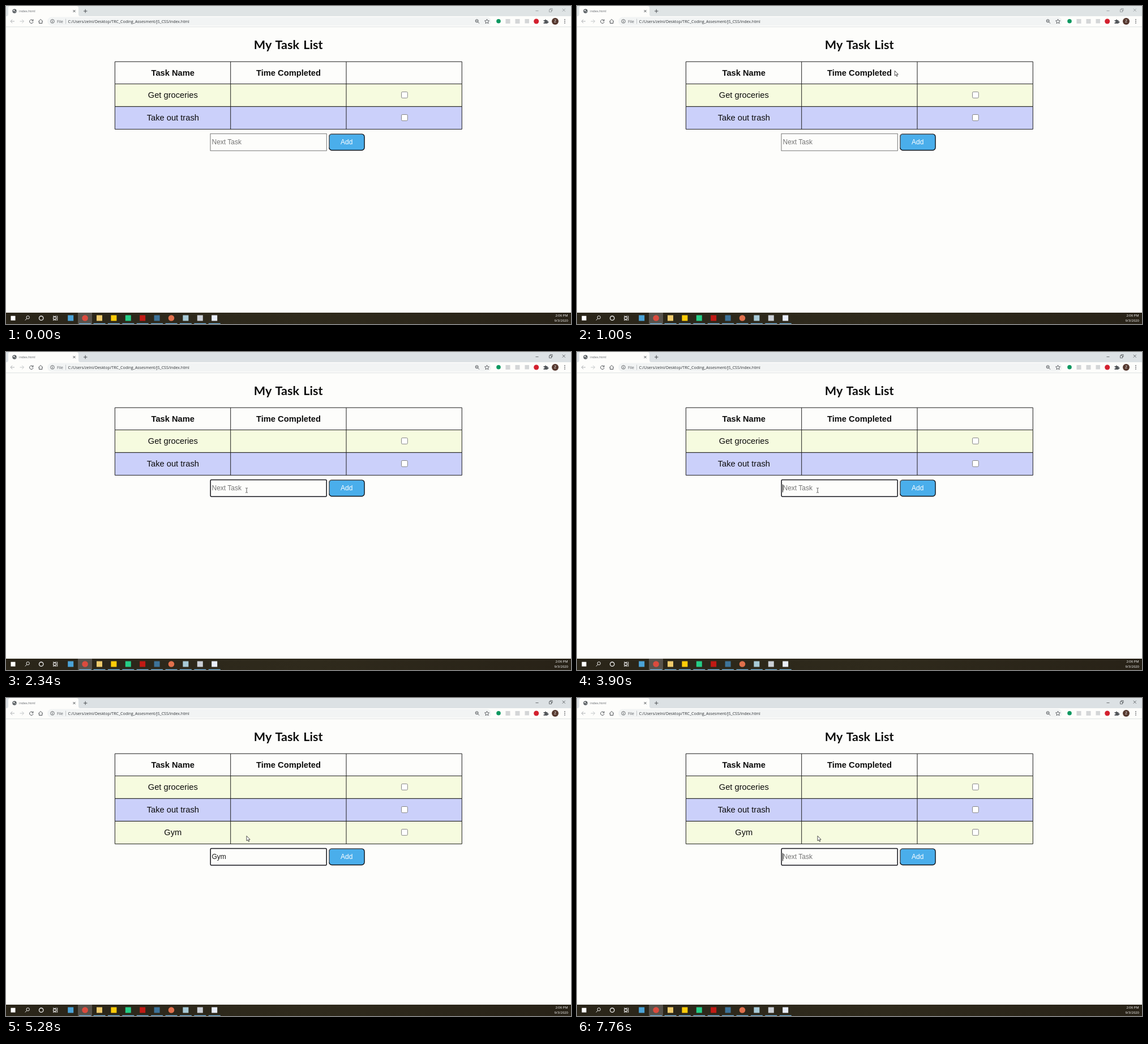
An HTML page that plays this animation: 998 px wide and 561 px high, repeating every 8 s.

```html
<!DOCTYPE html>
<html lang="en">
<head>
<meta charset="utf-8">
<title>My Task List</title>
<style>
  html, body { margin: 0; height: 100%; overflow: hidden; background: #fdfdfb; }
  svg { display: block; width: 998px; height: 561px; }
  text { font-family: "Liberation Sans", Arial, sans-serif; fill: #0c0c0c; }
  .ui text { font-family: "Open Sans", "Noto Sans", sans-serif; }
  .title { font: 700 21.6px Lato, sans-serif; word-spacing: 2px; text-anchor: middle; }
  .line { fill: none; stroke: #4d5155; stroke-width: 1; }
  .cell { font-size: 14.7px; text-anchor: middle; }
  .field { font-size: 12px; }
  .grid { fill: none; stroke: #1c1c1c; stroke-width: 1; }
</style>
</head>
<body>
<svg viewBox="0 0 998 561">
  <defs>
    <linearGradient id="bar">
      <stop offset="0" stop-color="#2a2519"/>
      <stop offset=".55" stop-color="#2f2a1c"/>
      <stop offset="1" stop-color="#282217"/>
    </linearGradient>
  </defs>
  <rect width="998" height="561" fill="#fdfdfb"/>

  <g class="ui">
    <rect id="strip" width="998" height="18"/>
    <path d="M1 18Q4 18 4 14V4Q4 0 8 0H124Q128 0 128 4V14Q128 18 131 18Z" fill="#fdfdfb"/>
    <circle cx="15" cy="9" r="3.7" fill="#5b6064"/>
    <path d="M12.5 8l2-1.5 1 1.5-1 1.5zM15.5 11l1.5-2 .5 1z" fill="#fff"/>
    <text x="23" y="11" font-size="5.8" style="fill:#5f6368">index.html</text>
    <path class="line" d="M118.500 7l4 4m0-4l-4 4M137 9h6.500M140.200 5.700v6.500"/>
    <g id="controls" class="line">
      <path d="M935.500 8.500h5M959.500 6.500h4v4h-4zM961 6v-1.500h4v4h-1.500M982.800 4.700l5 5m0-5l-5 5" stroke-width=".8"/>
    </g>

    <path d="M0 36.800H998" stroke="#dde0e2"/>
    <rect x="73" y="19.500" width="784" height="15" rx="7.500" fill="#f2f4f4"/>
    <path class="line" d="M15 27H8m3.200-3.200L8 27l3.200 3.200" style="stroke:#adb0b3"/>
    <path class="line" d="M24.500 27h7m-3.200-3.200l3.200 3.200-3.200 3.200" style="stroke:#c3c6c8"/>
    <path class="line" d="M47.300 25.200A3.200 3.200 0 1 0 48 28M48 23.500v2.700h-2.700M57.300 27.300L61.200 23.500l3.900 3.800M58.500 26.500v4h5.400v-4"/>
    <circle class="line" cx="82" cy="27" r="3.300" style="stroke-width:.8"/>
    <path class="line" d="M82 26.500v2.500M82 24.700v.9"/>
    <text x="90" y="29.500" font-size="6.980" style="fill:#5f6368">File</text>
    <path d="M105.500 22.500v9" stroke="#c4c7ca"/>
    <text x="109.500" y="29.500" font-size="6.980" style="fill:#303438">C:/Users/zelni/Desktop/TRC_Coding_Assesment/JS_CSS/index.html</text>

    <circle class="line" cx="831.700" cy="26.300" r="2.500"/>
    <path class="line" d="M833.500 28.200l2.500 2.500M830.500 26.300h2.400"/>
    <path class="line" style="stroke-width:.9" d="M849.500 23.200l1.200 2.600 2.800.3-2.100 1.900.6 2.800-2.500-1.500-2.500 1.500.6-2.800-2.100-1.900 2.800-.3z"/>
    <circle cx="870" cy="26.800" r="3.800" fill="#0c9860"/>
    <g fill="#d4d6d7">
      <rect x="882.500" y="23" width="8" height="8"/>
      <rect x="899.500" y="23" width="8" height="8"/>
      <rect x="916.500" y="23" width="7.500" height="7.500"/>
    </g>
    <circle cx="936.700" cy="27" r="4.500" fill="#d3202e"/>
    <path d="M949.500 25h2.200a1.300 1.300 0 1 1 2.600 0h2.200v2.200a1.300 1.300 0 1 1 0 2.200v1.600h-7v-2a1.300 1.300 0 1 0 0-2.300z" fill="#53575b"/>
    <circle cx="970" cy="27" r="6" fill="#55382f"/>
    <text x="970" y="29.300" font-size="6.300" text-anchor="middle" style="fill:#fff">Z</text>
    <path d="M987 23.300v1.500m0 1.500v1.500m0 1.500v1.500" stroke="#505458" stroke-width="1.500"/>
  </g>

  <text class="title" x="498.700" y="75.500">My Task List</text>
  <g class="cell" font-weight="700">
    <text x="294.800" y="123">Task Name</text>
    <text x="499" y="123">Time Completed</text>
  </g>
  <g id="rows"></g>
  <path class="grid" d="M192.400 137.400V98.200H805.300V137.400M396.700 98.200v39.200M601 98.200v39.200"/>

  <g id="form">
    <rect id="box" fill="#fdfdfb"/>
    <text id="entry" class="field" x="363.500" y="244.300"></text>
    <rect id="caret" y="233.500" width="1" height="14" fill="#222"/>
    <rect x="570.700" y="225.900" width="62.400" height="28.600" rx="5" fill="#4aaeeb" stroke="#101217" stroke-width="1.400"/>
    <path d="M570.700 250V230.900q0-5 5-5H628.500" fill="none" stroke="#6c7075" stroke-width="1.400"/>
    <text class="field" x="601.700" y="244.300" text-anchor="middle" style="fill:#fff">Add</text>
  </g>

  <g class="ui">
    <rect y="541" width="998" height="20" fill="url(#bar)"/>
    <rect x="127" y="541" width="25" height="20" fill="#57534c"/>
    <rect x="8.500" y="546.700" width="8" height="8" fill="#fff"/>
    <g fill="none" stroke="#f1f1f1">
      <circle cx="38.700" cy="549.300" r="2.700"/>
      <path d="M36.800 551.300l-3 3.200"/>
      <circle cx="62.200" cy="550.700" r="3.700" stroke-width="1.300"/>
      <path d="M83.500 549h5v3.500h-5zM83.500 546.500v1h5v-1M83.500 555v-1h5v1M90.700 546.500v8.500"/>
    </g>
    <g id="apps"></g>
    <text x="992.500" y="548" font-size="5.900" text-anchor="end" style="fill:#fff">2:06 PM</text>
    <text x="993" y="557" font-size="5.900" text-anchor="end" style="fill:#fff">9/3/2020</text>
  </g>

  <path id="arrow" d="M0 0V8.700L2 6.900 3.400 10 4.800 9.400 3.500 6.400H6.100Z" fill="#fff" stroke="#222" stroke-width=".8"/>
  <path id="beam" d="M-2-4H-.5L0-3.500.5-4H2M-2 4H-.5L0 3.500.5 4H2M0-3.500V3.500" fill="none" stroke="#4a4a4a" stroke-width=".9"/>
</svg>

<script>
const LOOP = 8000, FOCUS = 1845, ADDED = 5170, ROW = 40;
const $ = id => document.getElementById(id);
const show = (id, on) => $(id).setAttribute('visibility', on ? 'visible' : 'hidden');
const setAttrs = (id, attrs) => {
  for (const name in attrs) $(id).setAttribute(name, attrs[name]);
};

$('rows').innerHTML = ['Get groceries', 'Take out trash', 'Gym'].map((task, i) => `
  <g id="row${i}" transform="translate(0 ${i * ROW})">
    <rect x="192.400" y="137.400" width="612.900" height="40" fill="${i % 2 ? '#cbd0fa' : '#f6fbdf'}"/>
    <path class="grid" d="M192.400 137.400v40H805.300v-40zM396.700 137.400v40M601 137.400v40"/>
    <text class="cell" x="294.800" y="161.700">${task}</text>
    <rect x="698.500" y="151.500" width="10.800" height="10.800" rx="1.700" fill="#fff" stroke="#858585"/>
  </g>`).join('');

const round = ['#db4b3e', '#e0704c'];
const appColors = ['#4ba3d8', round[0], '#f0cb6c', '#ffcc08', '#25ce87', '#c11a14',
                   '#3d7399', round[1], '#a9cbd8', '#cbd0d7', '#e9eefb'];
$('apps').innerHTML = appColors.map((color, i) => {
  const x = 114.200 + i * 25.400;
  const icon = round.includes(color)
    ? `<circle cx="${x}" cy="550.500" r="5.300" fill="${color}"/>`
    : `<rect x="${x - 5}" y="545.500" width="10" height="10" fill="${color}"/>`;
  const underline = i ? `<rect x="${x - 10.500}" y="559.700" width="21" height="1.300" fill="#76b7e4"/>` : '';
  return icon + underline;
}).join('');

// Keys hold [time, value]; a step keeps its value until the next key.
const typing = [[0, ''], [4170, 'G'], [4410, 'Gy'], [4590, 'Gym'], [6830, 'Gy'], [7100, 'G'], [7240, '']];
const blink = [[0, 0], [1860, 1], [2325, 0], [2860, 1], [3400, 0], [3900, 1],
               [5100, 0], [5620, 1], [6140, 0], [6690, 1], [7240, 0], [7760, 1]];
const pointer = [[450, 1000, 92], [1000, 561.500, 114], [1630, 420, 242], [1690, 425, 244]];

const stepAt = (keys, t) => keys.findLast(key => key[0] <= t)[1];

function pointerAt(t) {
  const next = pointer.findIndex(key => key[0] > t);
  if (next < 0) return pointer.at(-1).slice(1);
  if (!next) return [1010, 92];
  const [t0, x0, y0] = pointer[next - 1], [t1, x1, y1] = pointer[next];
  const k = (t - t0) / (t1 - t0);
  return [x0 + (x1 - x0) * k, y0 + (y1 - y0) * k];
}

function render(t) {
  const focused = t >= FOCUS, added = t >= ADDED, value = stepAt(typing, t);

  setAttrs('strip', { fill: focused ? '#dce1e4' : '#dfe4e5' });
  setAttrs('controls', { opacity: focused ? 1 : .55 });
  show('row2', added);
  setAttrs('form', { transform: `translate(0 ${added ? ROW : 0})` });
  setAttrs('box', focused
    ? { x: 361.200, y: 225.500, width: 205, height: 29.500, rx: 1.500, stroke: '#15151c', 'stroke-width': 1.500 }
    : { x: 361, y: 225.300, width: 205.300, height: 30, rx: 0, stroke: '#777', 'stroke-width': 1 });

  const entry = $('entry');
  entry.textContent = value || 'Next Task';
  entry.style.fill = value ? '#151515' : '#757575';
  setAttrs('caret', { x: 363 + (value ? entry.getComputedTextLength() : 0) });
  show('caret', stepAt(blink, t));

  const [x, y] = pointerAt(t);
  const overField = !added && x > 361 && x < 566 && y > 225;
  show('beam', overField);
  show('arrow', !overField);
  setAttrs('beam', { transform: `translate(${x} ${y})` });
  setAttrs('arrow', { transform: `translate(${x} ${y - (added ? .7 : 0)})` });
}

function frame() {
  render(performance.now() % LOOP);
  requestAnimationFrame(frame);
}
frame();
</script>
</body>
</html>
```
